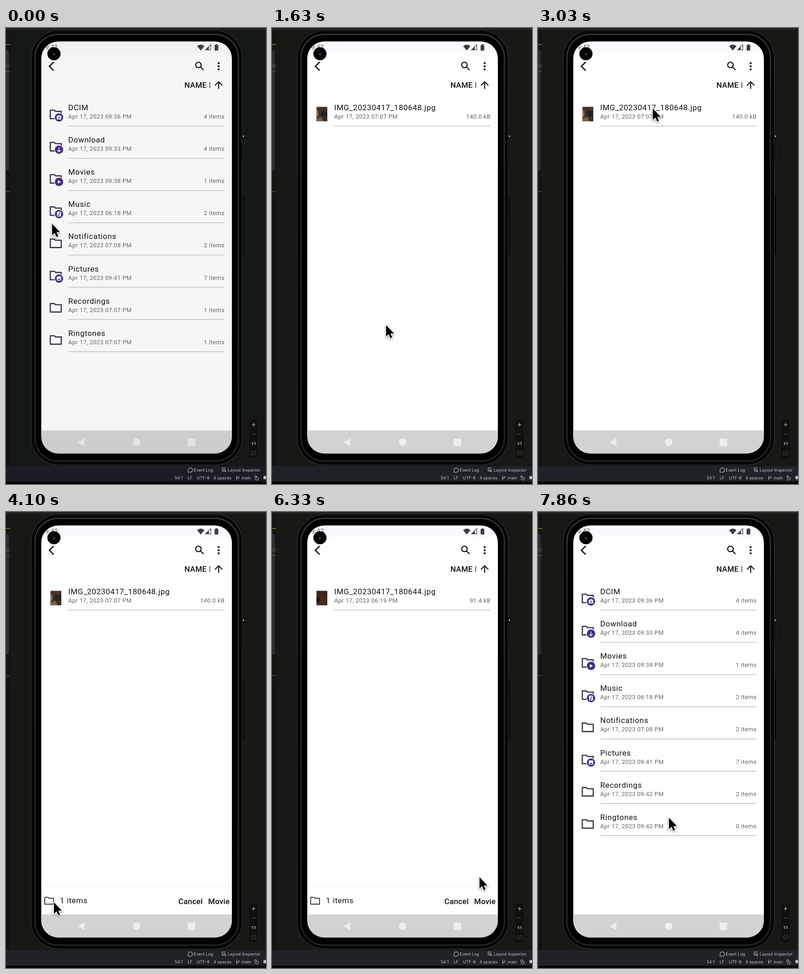
Animation of 564x992 px, one loop 8000 ms. Source, as an HTML page with a canvas:

```html
<!DOCTYPE html>
<html lang="en">
<head>
<meta charset="utf-8">
<title>File manager</title>
<style>
html, body { margin: 0; width: 100%; height: 100%; overflow: hidden; background: #181814; }
canvas { display: block; width: 564px; height: 992px; }
</style>
</head>
<body>
<canvas id="stage"></canvas>
<script>
const W = 564, H = 992, LOOP = 8000, ROW = 70.1;
const SCREEN = { x: 76.5, y: 29.5, w: 413.5, h: 896 };
const canvas = document.getElementById('stage');
const c = canvas.getContext('2d');
const dpr = window.devicePixelRatio || 1;
canvas.width = W * dpr;
canvas.height = H * dpr;

const SANS = 'Roboto, "Noto Sans", sans-serif';
const UI = 'Inter, "Open Sans", sans-serif';
const INK = '#111112', PURPLE = '#452d84', STATUS = '#3d3e42';

const FOLDERS = [
  { name: 'DCIM', time: '09:36', count: 4, badge: 'camera' },
  { name: 'Download', time: '09:33', count: 4, badge: 'down' },
  { name: 'Movies', time: '09:38', count: 1, badge: 'play' },
  { name: 'Music', time: '06:18', count: 2, badge: 'note' },
  { name: 'Notifications', time: '07:08', count: 2 },
  { name: 'Pictures', time: '09:41', count: 7, badge: 'image' },
  { name: 'Recordings', time: '07:07', count: 1 },
  { name: 'Ringtones', time: '07:07', count: 1 }
];

const SPOT = {
  start: [100, 426], middle: [251, 465], ringtones: [249, 699],
  file: [249, 175], below: [235, 230], sort: [366, 142], edge: [505, 68],
  folder: [104, 849], back: [97, 87], recordings: [258, 602],
  aboveBar: [433, 734], movie: [466, 850], leaving: [444, 834],
  idle: [360, 670], rest: [284, 665]
};

// from, to, spot, height of the arc
const MOVES = [
  [30, 300, 'middle'], [1100, 1400, 'ringtones'], [1560, 1900, 'below'],
  [1930, 2200, 'sort'], [2200, 2400, 'edge'], [2400, 2730, 'file'],
  [3230, 3630, 'folder'], [4100, 4500, 'back'], [4930, 5230, 'recordings'],
  [5800, 6200, 'aboveBar'], [6290, 6370, 'movie'], [6730, 6800, 'leaving'],
  [7060, 7400, 'idle'], [7560, 7860, 'rest', 203]
];

function pointer(t) {
  let [x, y] = SPOT.start;
  for (const [from, to, name, lift = 0] of MOVES) {
    if (t <= from) break;
    const u = Math.min(1, (t - from) / (to - from));
    const s = u * u * (3 - 2 * u);
    x += (SPOT[name][0] - x) * s;
    y += (SPOT[name][1] - y) * s - lift * Math.sin(Math.PI * u);
  }
  return [x, y];
}

const mix = (a, b, u) => `rgb(${a.map((v, i) => Math.round(v + (b[i] - v) * u))})`;

function rect(x, y, w, h, fill) {
  c.fillStyle = fill;
  c.fillRect(x, y, w, h);
}

function round(x, y, w, h, r, fill, stroke, lw = 1) {
  c.beginPath();
  c.roundRect(x, y, w, h, r);
  if (fill) { c.fillStyle = fill; c.fill(); }
  if (stroke) { c.strokeStyle = stroke; c.lineWidth = lw; c.stroke(); }
}

function disc(x, y, r, fill) {
  c.beginPath();
  c.arc(x, y, r, 0, Math.PI * 2);
  c.fillStyle = fill;
  c.fill();
}

function shape(d, fill) {
  c.fillStyle = fill;
  c.fill(new Path2D(d));
}

function line(d, color, lw) {
  c.strokeStyle = color;
  c.lineWidth = lw;
  c.stroke(new Path2D(d));
}

function at(x, y, scale, paint) {
  c.save();
  c.translate(x, y);
  c.scale(scale, scale);
  paint();
  c.restore();
}

function text(s, x, y, size, color, o = {}) {
  c.font = `${o.weight || 400} ${size}px ${o.font || SANS}`;
  c.letterSpacing = (o.gap || 0) + 'px';
  c.textAlign = o.align || 'left';
  c.fillStyle = color;
  c.fillText(s, x, y);
}

const label = (s, x, y) => text(s, x, y, 16.8, INK, { weight: 500, gap: 0.2 });
const title = (s, x, y) => text(s, x, y, 16.8, INK, { gap: 0.66 });
const small = (s, x, y, align) => text(s, x, y, 12.64, '#626265', { gap: 0.48, align });

function folderIcon(x, y, scale, color) {
  at(x, y, scale, () => {
    c.lineJoin = 'round';
    line('M-9 -7H-2.4L-.4 -5H9V7H-9Z', color, 2);
  });
}

function editor(u) {
  rect(0, 0, W, H, mix([20, 24, 23], [24, 24, 20], u));
  rect(0, 0, 9, 953, '#151518');
  rect(0, 370, 9, 583, '#111216');
  rect(0, 0, W, 4, '#1f2527');
  rect(561, 4, 3, 949, '#1b1d1c');
  round(-4, 48, 10.5, 262, 3, '#2d2e30');
  rect(0, 35, 9, 1.5, '#a8741f');
  for (const y of [80, 84, 94]) rect(0, y, 9, 1, '#7b5c22');
  rect(0, 355, 9, 1.5, '#4a4b4d');
}

function footer(u) {
  rect(0, 953, W, 34, mix([27, 28, 37], [30, 35, 40], u));
  rect(0, 987, W, 5, '#050607');
  const tint = '#bfc2c5';
  const note = (s, x, y) => text(s, x, y, 9, tint, { font: UI });
  note('Event Log', 407, 965);
  note('Layout Inspector', 481, 965);
  note('54:1', 366, 982);
  note('LF', 394, 982);
  note('UTF-8', 414, 982);
  note('4 spaces', 450, 982);
  note('main', 511, 982);
  line('M395 966.5h4.5a4.8 4.8 0 1 0 -4.5 -4.5z', tint, 1.1);
  line('M473 964h-4v-7h7M474 960a2 2 0 1 0 .1 0M475.5 964l2 2', tint, 1.1);
  line('M500.5 974v9M505.5 975v2q0 2.5-5 3', tint, 1.2);
  line('M539.5 978v-2a2 2 0 0 1 4 0v2', tint, 1.1);
  round(541, 978, 6.5, 5, 1, null, tint);
  round(558.5, 974.5, 8, 7, 1, tint);
}

function zoomPanel() {
  round(526.5, 851.5, 20, 85, 4, '#10110f', '#1d1e1c');
  line('M533 863h8M537 859v8', '#c5c6c6', 1.2);
  line('M533 883.5h8', '#4b4c4b', 1.2);
  text('1:1', 537, 907, 7.6, '#cfd0d0', { font: UI, weight: 700, align: 'center' });
  round(532, 921, 10, 8, 1, null, '#454644');
  line('M534.5 926.5l5-3.5', '#454644', 1);
}

function phone() {
  round(512, 234, 4, 59, 1.5, '#08090a', '#2b2d2e');
  rect(514, 234, 2, 3, '#dcdcdc');
  round(512, 363, 4, 130, 1.5, '#050606', '#101111');
  round(54.5, 5.5, 458, 945, 59, '#050606', '#303336', 1.2);
  const rim = c.createLinearGradient(0, 10, 0, 945);
  rim.addColorStop(0, '#3a3e41');
  rim.addColorStop(0.15, '#2c2f31');
  rim.addColorStop(1, '#25282a');
  round(63, 14, 441, 928, 50, '#000', rim, 2.5);
}

function statusBar(clock, u) {
  rect(76, 29, 415, 26, mix([241, 241, 244], [249, 249, 254], u));
  text(clock, 85, 47, 14, '#5b5c60', { gap: 0.2 });
  shape('M422.5 49L414.5 39.5Q422.5 32.5 430.5 39.5Z', STATUS);
  line('M432.8 47.6H444.3V36.3z', STATUS, 1.2);
  shape('M432 48H440V40.3Z', STATUS);
  round(452.5, 37, 8, 12, 1, STATUS);
  rect(454.5, 35.5, 4, 2, STATUS);
}

function header(essentials) {
  line('M103.5 74L94 83.3L103.5 92.6', INK, 2.7);
  line('M411.4 80.4a6 6 0 1 0 12 0a6 6 0 1 0 -12 0M421.8 84.8L428.4 91.4', INK, 2.3);
  for (const dy of [-1, 0, 1]) disc(461.3, 83.2 + dy * 6.8, 2.2, INK);
  label('NAME', 387, 130);
  text('|', 440, 129, 15.5, INK, { weight: 500 });
  line('M461.3 132.5V117.5M453.3 125L461.3 117L469.3 125', INK, 2.2);
  if (essentials) {
    label('Essentials', 92, 130);
    shape('M185.5 122h11l-5.5 5.5z', INK);
  }
}

const GLYPHS = {
  camera() {
    round(-5, -3.6, 10, 8, 1.2, '#fff');
    rect(-2, -4.8, 4, 2, '#fff');
    disc(0, 0.4, 2.5, PURPLE);
    disc(0, 0.4, 1.4, '#fff');
  },
  down() { line('M0 -5V4.6M-4 .8L0 4.8L4 .8', '#fff', 1.4); },
  play() { shape('M-2.4 -4V4L4 0Z', '#fff'); },
  note() {
    round(-4.2, -5.3, 8.4, 10.6, 1, '#fff');
    disc(-0.9, 2.3, 1.7, PURPLE);
    line('M.3 2.4V-2.6H2.6', PURPLE, 1.2);
  },
  image() {
    round(-4.8, -4.4, 9.6, 8.8, 1, '#fff');
    shape('M-3.6 3L-1.4 0L0 1.7L1.6 -.5L3.7 3Z', PURPLE);
  }
};

function entry(name, time, size, y) {
  title(name, 135, y + 179);
  small(`Apr 17, 2023 ${time} PM`, 135, y + 197);
  small(size, 474.3, y + 197, 'right');
  rect(135, y + 212.6, 339, 1.6, '#c3c3c5');
}

function folderList(moved, paper) {
  FOLDERS.forEach(({ name, time, count, badge }, i) => {
    const y = i * ROW;
    folderIcon(108, y + 188, 1.32, '#3a394d');
    if (badge) {
      disc(115, y + 194.5, 10.4, paper);
      disc(115, y + 194.5, 9.1, PURPLE);
      at(115, y + 194.5, 1, GLYPHS[badge]);
    }
    const changed = moved && i > 5;
    const items = changed ? (name === 'Recordings' ? 2 : 0) : count;
    entry(name, changed ? '09:42' : time, items + ' items', y);
  });
}

function photo(top, bottom, paint) {
  const g = c.createLinearGradient(0, 171, 0, 203);
  g.addColorStop(0, top);
  g.addColorStop(1, bottom);
  rect(96.5, 171.5, 23.5, 31.5, g);
  paint();
}

function room() {
  photo('#49352a', '#3a2a20', () => {
    rect(96.5, 180, 4, 13, '#8d7460');
    rect(106, 181, 13, 11, '#242321');
    shape('M96.5 203V197L107 193L112 203Z', '#7a5d46');
  });
}

function desk() {
  photo('#3a261b', '#4a2e1f', () => rect(96.5, 186, 7, 10, '#15171b'));
}

function moveBar() {
  rect(76, 814.5, 415, 1, '#efeff0');
  folderIcon(93.5, 845.7, 1.06, '#454548');
  title('1 items', 117, 851);
  label('Cancel', 374, 853);
  label('Movie', 438.5, 853);
}

function navBar(u) {
  rect(76, 875.5, 415, 51, mix([205, 205, 205], [210, 210, 213], u));
  const tint = mix([228, 228, 227], [237, 237, 237], u);
  shape('M155.5 901l14.5 -8.5v17z', tint);
  disc(283.3, 901, 8.2, tint);
  round(394, 893, 16.5, 16.5, 1, tint);
}

function camera() {
  disc(104, 56, 14.3, '#030304');
  disc(104, 57, 4.2, '#101424');
  disc(104, 57, 2, '#343c5c');
}

function cursor(t) {
  const arrow = new Path2D('M0 0V26.4L5.9 20.8L9.8 30L14 28.2L10.1 19.2H18.2Z');
  at(...pointer(t), 0.95, () => {
    c.lineJoin = 'round';
    c.shadowColor = 'rgba(0,0,0,.4)';
    c.shadowBlur = 4 * dpr;
    c.shadowOffsetY = 2 * dpr;
    c.strokeStyle = '#fff';
    c.lineWidth = 3;
    c.stroke(arrow);
    c.shadowColor = 'transparent';
    c.fillStyle = '#000';
    c.fill(arrow);
  });
}

function draw(t) {
  const u = Math.min(1, Math.max(0, (t - 30) / 270));
  const paper = mix([246, 246, 245], [254, 254, 253], u);
  c.setTransform(dpr, 0, 0, dpr, 0, 0);
  editor(u);
  footer(u);
  zoomPanel();
  phone();

  c.save();
  round(SCREEN.x, SCREEN.y, SCREEN.w, SCREEN.h, 37, paper);
  c.clip();
  statusBar(t < 460 ? '9:41' : '9:42', u);
  header(t >= 4660 && t < 5640);
  if (t >= 1500 && t < 4660) {
    room();
    entry('IMG_20230417_180648.jpg', '07:07', '140.0 kB', 0);
  } else if (t >= 5640 && t < 6730) {
    desk();
    entry('IMG_20230417_180644.jpg', '06:19', '91.4 kB', 0);
  } else {
    folderList(t >= 6730, paper);
  }
  if (t >= 3830 && t < 6730) moveBar();
  navBar(u);
  c.restore();

  camera();
  cursor(t);
}

const start = performance.now();
function tick() {
  draw((performance.now() - start) % LOOP);
  requestAnimationFrame(tick);
}
tick();
</script>
</body>
</html>
```
